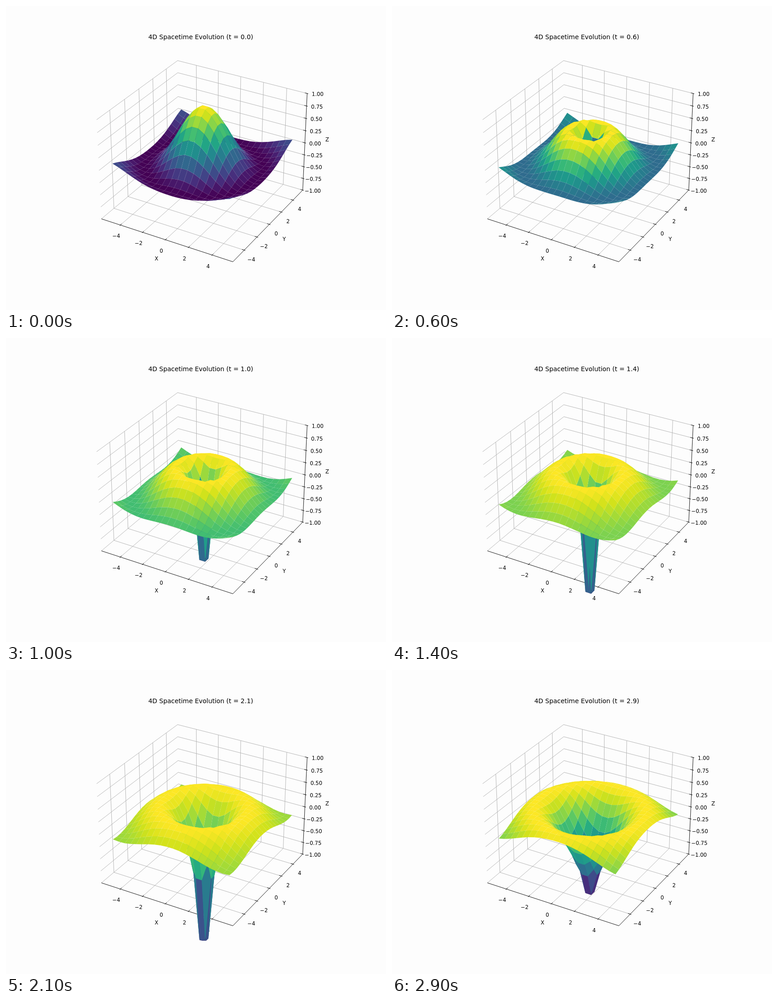
These frames come from a looping animation (837 px wide and 669 px high, 3000 ms). An HTML page with a canvas:

```html
<!DOCTYPE html>
<html lang="en">
<head>
<meta charset="utf-8">
<title>4D Spacetime Evolution</title>
<style>
  html, body { margin: 0; width: 100%; height: 100%; overflow: hidden; background: #fdfdfd; }
  canvas { display: block; }
</style>
</head>
<body>
<canvas id="stage" width="837" height="669"></canvas>
<script>
const ctx = document.getElementById('stage').getContext('2d');

// Layout happens on a 1000 x 800 figure that is scaled down to the stage.
const FIG = { w: 1000, h: 800 };
const AXES = { x: 204.5, y: 96, size: 616 };
const VIEW = { min: -0.095, span: 0.185 };
const UNIT = AXES.size / VIEW.span;
const ORIGIN = {
  x: AXES.x - VIEW.min * UNIT,
  y: AXES.y + AXES.size + VIEW.min * UNIT
};

const FRAME_MS = 100, FRAMES = 30;
const GRID = 20, EXTENT = 5;
const XY_LIMIT = 5.5 * 25 / 24;
const HALF = { xy: 0.59524, z: 0.44643 };
const DISTANCE = 10;
const ELEV = Math.PI / 6, AZIM = -Math.PI / 3;
const [SE, CE, SA, CA] = [Math.sin(ELEV), Math.cos(ELEV), Math.sin(AZIM), Math.cos(AZIM)];

// Outward offsets, as a fraction of half an axis.
const TICK_OUT = 1 / 60, TICK_IN = 1 / 30, TICK_LABEL = 0.1037, AXIS_LABEL = 0.2255;

const VIRIDIS = ('440154 481a6c 472f7d 414487 39568c 31688e 2a788e 23888e ' +
  '1f988b 22a884 35b779 54c568 7ad151 a5db36 d2e21b fde725')
  .split(' ').map(hex => [0, 2, 4].map(i => parseInt(hex.slice(i, i + 2), 16)));

function viridis(v) {
  const s = Math.min(1, Math.max(0, v)) * (VIRIDIS.length - 1);
  const i = Math.min(VIRIDIS.length - 2, Math.floor(s));
  const mix = VIRIDIS[i].map((c, k) => Math.round(c + (VIRIDIS[i + 1][k] - c) * (s - i)));
  return `rgb(${mix})`;
}

// Perspective projection of a point in the [-1, 1] cube.
function project(nx, ny, nz) {
  const x = nx * HALF.xy, y = ny * HALF.xy, z = nz * HALF.z;
  const along = x * CA + y * SA;
  const depth = DISTANCE - CE * along - SE * z;
  return {
    x: ORIGIN.x + (y * CA - x * SA) / depth * UNIT,
    y: ORIGIN.y - (CE * z - SE * along) / depth * UNIT,
    near: 1 / depth
  };
}

function tracePath(points) {
  ctx.beginPath();
  points.forEach(p => ctx.lineTo(p.x, p.y));
}

function line(color, ...corners) {
  tracePath(corners.map(c => project(...c)));
  ctx.strokeStyle = color;
  ctx.stroke();
}

function text(string, x, baseline, size) {
  ctx.font = `${size}px "DejaVu Sans", sans-serif`;
  ctx.fillText(string, x, baseline);
}

function label(string, corner, drop) {
  const p = project(...corner);
  text(string, p.x, p.y + drop, 13.89);
}

const signed = (v, digits) => (v < 0 ? '\u2212' : '') + Math.abs(v).toFixed(digits);
const XY_TICKS = [-4, -2, 0, 2, 4];
const Z_TICKS = Array.from({ length: 9 }, (_, i) => -1 + i / 4);

function drawAxes() {
  const gray = '#b0b0b0', black = '#000';
  ctx.lineWidth = 1.11;
  ctx.fillStyle = black;
  ctx.textAlign = 'center';

  for (const value of XY_TICKS) {
    const n = value / XY_LIMIT;
    line(gray, [n, -1, -1], [n, 1, -1], [n, 1, 1]);
    line(gray, [1, n, -1], [-1, n, -1], [-1, n, 1]);
  }
  for (const n of Z_TICKS) line(gray, [-1, -1, n], [-1, 1, n], [1, 1, n]);

  line(black, [-1, -1, -1], [1, -1, -1]);
  line(black, [1, -1, -1], [1, 1, -1]);
  line(black, [1, 1, -1], [1, 1, 1]);

  const out = 1 + TICK_OUT, inner = 1 - TICK_IN, far = 1 + TICK_LABEL, drop = 10.6;
  for (const value of XY_TICKS) {
    const n = value / XY_LIMIT;
    line(black, [n, -out, -1], [n, -inner, -1]);
    line(black, [out, n, -1], [inner, n, -1]);
    label(signed(value, 0), [n, -far, -far], drop);
    label(signed(value, 0), [far, n, -far], drop);
  }
  for (const n of Z_TICKS) {
    line(black, [out, 1, n], [inner, 1, n]);
    label(signed(n, 2), [far, far, n], drop);
  }

  const name = 1 + AXIS_LABEL;
  label('X', [0, -name, -name], 3.7);
  label('Y', [name, 0, -name], 3.7);
  label('Z', [name, name, 0], 3.7);
}

function height(x, y, t) {
  const r = Math.sqrt(x * x + y * y + 0.01);
  return Math.sin(r - t) / r;
}

function surfaceFaces(t) {
  const at = i => -EXTENT + 2 * EXTENT * i / (GRID - 1);
  const vertex = (i, j) => {
    const x = at(i), y = at(j), z = height(x, y, t);
    return { z, ...project(x / XY_LIMIT, y / XY_LIMIT, z) };
  };
  const mean = (points, key) => points.reduce((sum, p) => sum + p[key], 0) / points.length;
  const faces = [];
  for (let j = 0; j < GRID - 1; j++) {
    for (let i = 0; i < GRID - 1; i++) {
      const points = [vertex(i, j), vertex(i + 1, j), vertex(i + 1, j + 1), vertex(i, j + 1)];
      faces.push({ points, z: mean(points, 'z'), near: mean(points, 'near') });
    }
  }
  return faces.sort((a, b) => a.near - b.near);
}

function drawSurface(t) {
  const faces = surfaceFaces(t);
  const levels = faces.map(f => f.z);
  const low = Math.min(...levels), high = Math.max(...levels);
  ctx.save();
  ctx.beginPath();
  ctx.rect(AXES.x, AXES.y, AXES.size, AXES.size);
  ctx.clip();
  for (const face of faces) {
    tracePath(face.points);
    ctx.fillStyle = viridis((face.z - low) / (high - low));
    ctx.fill();
  }
  ctx.restore();
}

let shown = -1;

function render() {
  const step = Math.floor(performance.now() / FRAME_MS) % FRAMES;
  if (step !== shown) {
    shown = step;
    const t = step / 10;
    ctx.setTransform(837 / FIG.w, 0, 0, 669 / FIG.h, 0, 0);
    ctx.fillStyle = '#fdfdfd';
    ctx.fillRect(0, 0, FIG.w, FIG.h);
    drawAxes();
    text(`4D Spacetime Evolution (t = ${t.toFixed(1)})`, 512.5, 87.7, 16.67);
    drawSurface(t);
  }
  requestAnimationFrame(render);
}
render();
</script>
</body>
</html>
```
